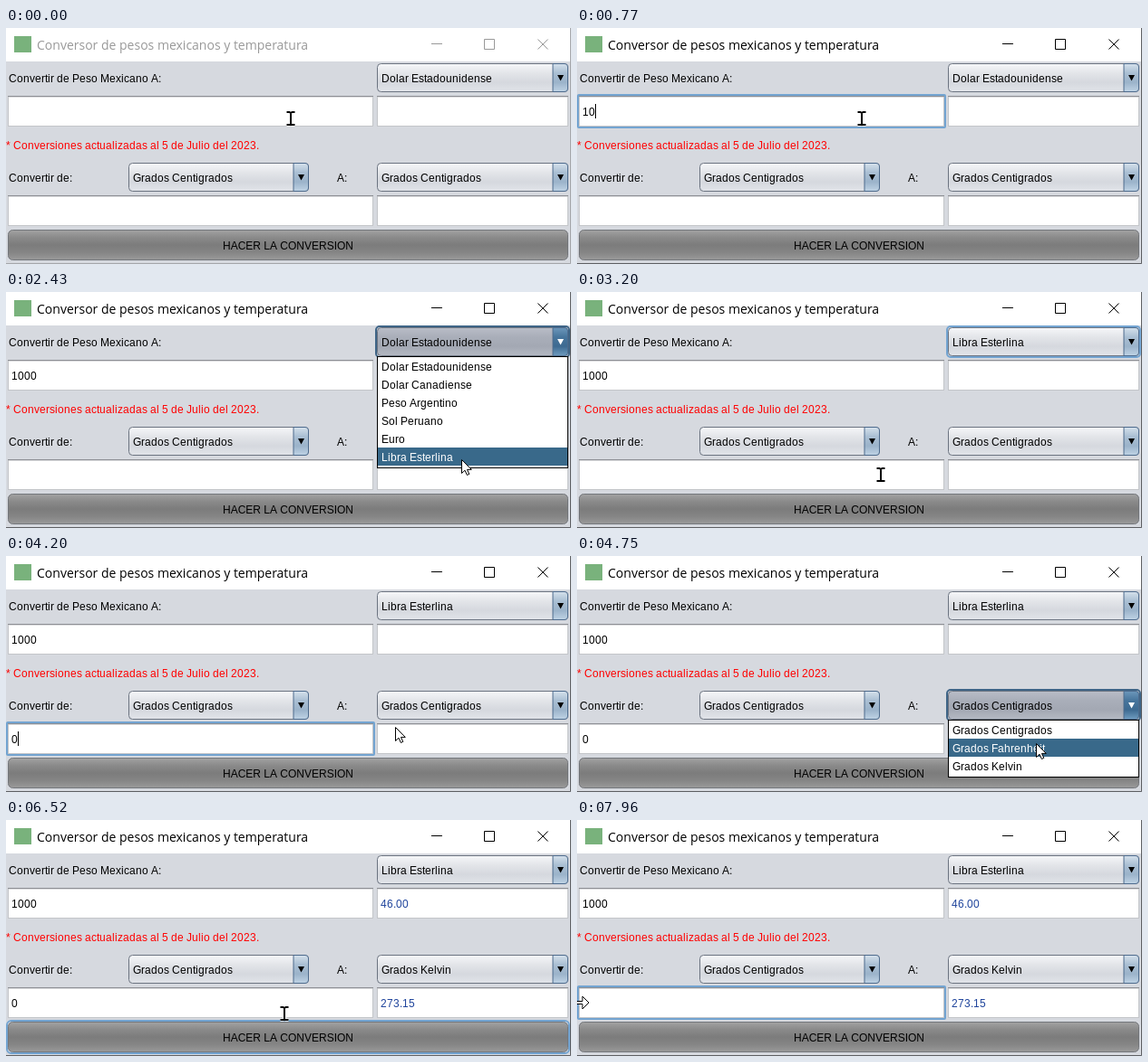
An HTML page for the animation above (8000 ms loop, 623x261 px).

```html
<!DOCTYPE html>
<html lang="es">
<head>
<meta charset="utf-8">
<title>Conversor</title>
<style>
html, body { margin: 0; width: 100%; height: 100%; overflow: hidden; background: #d6d9df; }
svg { display: block; width: 623px; height: 261px; }
text { font: 12px "Liberation Sans", Arial, sans-serif; font-kerning: none; white-space: pre; }
.title { font: 14px "Open Sans", "Noto Sans", sans-serif; }
</style>
</head>
<body>
<svg id="stage" viewBox="0 0 623 261" xmlns="http://www.w3.org/2000/svg">
  <defs id="defs"></defs>
</svg>
<script>
const NS = "http://www.w3.org/2000/svg";
const stage = document.getElementById("stage");
const defs = document.getElementById("defs");
const pen = document.createElement("canvas").getContext("2d");
pen.font = '12px "Liberation Sans", Arial, sans-serif';
const LOOP = 8000;

function add(parent, tag, attrs, content) {
  const node = document.createElementNS(NS, tag);
  for (const key in attrs) node.setAttribute(key, attrs[key]);
  if (content !== undefined) node.textContent = content;
  parent.appendChild(node);
  return node;
}
const rect = (parent, x, y, width, height, fill, more) =>
  add(parent, "rect", { x, y, width, height, fill, ...more });
const path = (parent, d, more) => add(parent, "path", { d, fill: "none", ...more });
const show = (node, on) => node.setAttribute("visibility", on ? "inherit" : "hidden");

// Letters advance by whole pixels; returns the end of the text
function setText(node, x, content) {
  const places = [];
  for (const c of content) {
    places.push(x);
    x += Math.round(pen.measureText(c).width);
  }
  if (node.textContent !== content) {
    node.textContent = content;
    node.setAttribute("x", places.join(" "));
  }
  return x;
}
function label(parent, x, y, content, fill = "#000") {
  const node = add(parent, "text", { y, fill });
  setText(node, x, content);
  return node;
}

function gradient(id, ...colors) {
  const g = add(defs, "linearGradient", { id, x1: 0, y1: 0, x2: 0, y2: 1 });
  colors.forEach((c, i) => add(g, "stop", { offset: i / (colors.length - 1), "stop-color": c }));
}
gradient("body", "#f6f7f9", "#e3e5e9", "#d5d8de", "#e1e4e9");
gradient("bodyHover", "#fdfdfe", "#f1f2f5", "#e4e7ec", "#f2f4f7");
gradient("bodyOpen", "#b9bdc7", "#a9aeb9", "#a3a8b3", "#b4b9c3");
gradient("knob", "#d5e1ec", "#aabfd3", "#9bb3ca", "#bfd3e5");
gradient("knobOpen", "#6c97bb", "#47759c", "#3d6a91", "#6f9cc0");
gradient("push", "#a2a2a2", "#8a8a8a", "#7c7c7c", "#858585", "#9a9a9a");

function ring(x, y, w, h, r) {
  return rect(stage, x - 1, y - 1, w + 2, h + 2, "none",
    { rx: r, stroke: "#73a4d1", "stroke-width": 2 });
}

function makeField(x, y, w, color) {
  const h = 34;
  rect(stage, x, y, w, h, "#fff");
  rect(stage, x + .5, y + .5, w - 1, h - 1, "none", { stroke: "#c3c5c9" });
  rect(stage, x, y, w, 1, "#8d8f94");
  rect(stage, x + 1, y + 1, w - 2, 1, "#dcdddf");
  const glow = ring(x, y, w, h, 1);
  const mark = rect(stage, x + 4, y + 9, 7, 16, "#39698a");
  const text = label(stage, x + 4, y + 22, "", color);
  const caret = rect(stage, 0, y + 9, 1, 16, "#000");
  return (value, focus, caretOn, selected) => {
    caret.setAttribute("x", setText(text, x + 4, value));
    text.setAttribute("fill", selected ? "#fff" : color);
    show(glow, focus);
    show(mark, selected);
    show(caret, caretOn);
  };
}

function makeCombo(x, y, w) {
  const h = 32, edge = x + w - 17, cx = x + w - 8.5;
  const glow = ring(x, y, w, h, 4);
  const body = rect(stage, x + .5, y + .5, w - 1, h - 1, "url(#body)", { rx: 4, stroke: "#6b7380" });
  const knob = path(stage, `M${edge} ${y + .5}h13q3.5 0 3.5 3.5v${h - 8}q0 3.5 -3.5 3.5h-13z`,
    { stroke: "#4d6a8c" });
  const arrow = path(stage, `M${cx - 3.5} ${y + 13}h7l-3.5 6.5z`);
  const text = label(stage, x + 5, y + 21, "");
  return (value, focus, open, hover) => {
    setText(text, x + 5, value);
    show(glow, focus);
    glow.setAttribute("stroke", open ? "#3f6587" : "#73a4d1");
    body.setAttribute("fill", `url(#body${open ? "Open" : hover ? "Hover" : ""})`);
    knob.setAttribute("fill", `url(#knob${open ? "Open" : ""})`);
    arrow.setAttribute("fill", open ? "#fff" : "#000");
  };
}

function makePopup(x, y, w, items) {
  const g = add(stage, "g");
  rect(g, x + .5, y + .5, w - 1, items.length * 20 + 3, "#fff", { stroke: "#000" });
  const bar = rect(g, x + 1, 0, w - 2, 20, "#39698a");
  const rows = items.map((s, i) => label(g, x + 5, y + 16 + i * 20, s));
  return index => {
    show(g, index >= 0);
    bar.setAttribute("y", y + 1 + Math.max(index, 0) * 20);
    rows.forEach((row, i) => row.setAttribute("fill", i === index ? "#fff" : "#000"));
  };
}

// Window frame
rect(stage, 0, 0, 623, 261, "#d6d9df");
rect(stage, 0, 0, 623, 37, "#fff");
rect(stage, 9, 9, 19, 18, "#79b27c");
const title = add(stage, "text", { x: 34, y: 24, class: "title" },
  "Conversor de pesos mexicanos y temperatura");
const controls = path(stage, "M469 17.5h12M527.5 12.5h11v11h-11zM586.5 12.5l11 11M597.5 12.5l-11 11");
const border = path(stage, "M622.5 0V260.5H0");

// Form
label(stage, 3, 60, "Convertir de Peso Mexicano A:");
label(stage, 0, 134, "* Conversiones actualizadas al 5 de Julio del 2023.", "#f00");
label(stage, 3, 170, "Convertir de:");
label(stage, 365, 170, "A:");
const setCurrency = makeCombo(409, 39, 211);
const setFrom = makeCombo(135, 149, 199);
const setTo = makeCombo(409, 149, 211);
const setPesos = makeField(2, 75, 403, "#000");
const setMoney = makeField(409, 75, 211, "#1f449c");
const setDegrees = makeField(2, 185, 403, "#000");
const setResult = makeField(409, 185, 211, "#1f449c");

const buttonGlow = ring(2, 223, 618, 34, 5);
rect(stage, 2.5, 223.5, 617, 33, "url(#push)", { rx: 5, stroke: "#74777c" });
add(stage, "text", { x: 311, y: 245, "text-anchor": "middle" }, "HACER LA CONVERSION");

const currencies = ["Dolar Estadounidense", "Dolar Canadiense", "Peso Argentino", "Sol Peruano", "Euro", "Libra Esterlina"];
const scales = ["Grados Centigrados", "Grados Fahrenheit", "Grados Kelvin"];
const currencyPopup = makePopup(409, 71, 211, currencies);
const scalePopup = makePopup(409, 181, 211, scales);

// Pointers, each drawn around its hot spot
const beam = "M-4.5 -7H-1.5L0 -6L1.5 -7H4.5M0 -6V6M-4.5 7H-1.5L0 6L1.5 7H4.5";
const pointers = { beam: add(stage, "g"), arrow: add(stage, "g"), resize: add(stage, "g") };
path(pointers.beam, beam, { stroke: "#fff", "stroke-width": 3.5 });
path(pointers.beam, beam, { stroke: "#000", "stroke-width": 2 });
path(pointers.arrow, "M-.5 -.5V14.5L3 11.2L5.4 16.5L7.8 15.4L5.5 10.4H10.3Z", { fill: "#fff", stroke: "#000" });
path(pointers.resize, "M-11 0L-4 -7V-1.5H4V-7L11 0L4 7V1.5H-4V7Z", { fill: "#fff", stroke: "#000" });

// Tables of [start time, value...]
const moves = [
  [0, 314, 100, "beam"],
  [1440, 326, 97, "beam"], [1550, 366, 90, "beam"], [1660, 436, 78, "arrow"], [1770, 489, 70, "arrow"],
  [1880, 540, 63, "arrow"], [1990, 580, 58, "arrow"], [2100, 602, 55, "arrow"],
  [2210, 590, 76, "arrow"], [2320, 545, 136, "arrow"], [2430, 503, 186, "arrow"],
  [2980, 480, 189, "arrow"], [3090, 400, 197, "beam"], [3200, 335, 202, "beam"], [3310, 318, 203, "beam"],
  [4090, 345, 201, "beam"], [4200, 430, 190, "arrow"], [4310, 525, 177, "arrow"],
  [4420, 595, 167, "arrow"], [4530, 603, 166, "arrow"],
  [4750, 507, 208, "arrow"], [4860, 496, 224, "arrow"], [4970, 490, 231, "arrow"],
  [5190, 475, 233, "arrow"], [5300, 440, 236, "arrow"], [5410, 400, 238, "arrow"],
  [5520, 365, 239, "arrow"], [5640, 340, 239, "arrow"], [5750, 325, 239, "arrow"],
  [6520, 307, 214, "beam"], [6630, 190, 207, "beam"], [6740, 70, 204, "beam"],
  [6850, 18, 202, "beam"], [6960, 2, 202, "resize"]
];
const focusSteps = [[0, ""], [330, "pesos"], [2100, "currency"], [3310, "degrees"],
  [4530, "to"], [5970, "button"], [6740, "degrees"]];
const pesosSteps = [[0, ""], [550, "1"], [770, "10"], [990, "1000"]];
const degreeSteps = [[0, ""], [3870, "0"], [7510, ""]];
const currencyRow = [[0, -1], [2100, 0], [2320, 3], [2430, 5], [2870, -1]];
const scaleRow = [[0, -1], [4530, 0], [4750, 1], [4860, 2], [5080, -1]];

const at = (table, t) => table.findLast(step => step[0] <= t);

function draw(t) {
  const active = t >= 330, done = t >= 5970;
  const focus = at(focusSteps, t)[1];
  const row = at(currencyRow, t)[1], unit = at(scaleRow, t)[1];
  const [, x, y, kind] = at(moves, t);
  const over = (left, top) => x >= left && x < 620 && y >= top && y < top + 32;

  title.setAttribute("fill", active ? "#000" : "#999");
  controls.setAttribute("stroke", active ? "#000" : "#999");
  border.setAttribute("stroke", active ? "#5d5f63" : "#a4a6aa");

  setCurrency(currencies[t < 2870 ? 0 : 5], focus === "currency", row >= 0, over(409, 39));
  setFrom(scales[0], false, false, false);
  setTo(scales[t < 5080 ? 0 : 2], focus === "to", unit >= 0, unit < 0 && over(409, 149));
  setPesos(at(pesosSteps, t)[1], focus === "pesos", focus === "pesos", false);
  setDegrees(at(degreeSteps, t)[1], focus === "degrees", focus === "degrees" && t < 7740,
    t >= 6960 && t < 7510);
  setMoney(done ? "46.00" : "", false, false, false);
  setResult(done ? "273.15" : "", false, false, false);
  show(buttonGlow, focus === "button");
  currencyPopup(row);
  scalePopup(unit);

  for (const name in pointers) show(pointers[name], name === kind);
  pointers[kind].setAttribute("transform", `translate(${x} ${y})`);
}

const start = performance.now();
function tick() {
  draw((performance.now() - start) % LOOP);
  requestAnimationFrame(tick);
}
tick();
</script>
</body>
</html>
```
